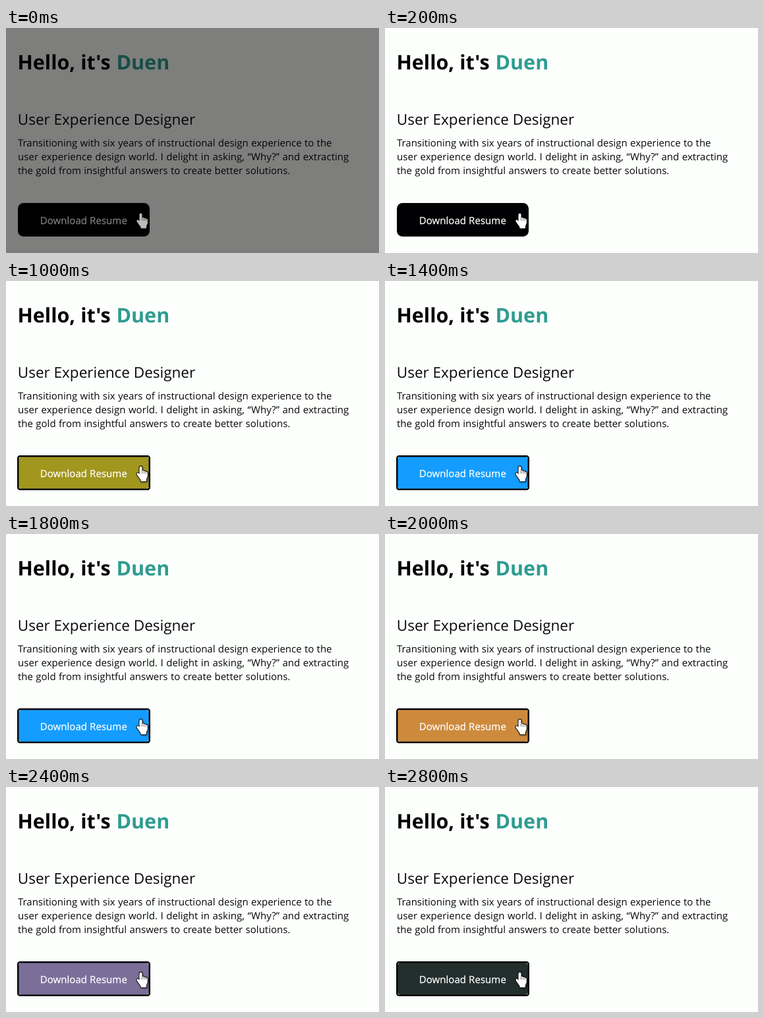
These frames come from a looping animation (566x342 px, 3 s). An HTML page:

```html
<!DOCTYPE html>
<html lang="en">
<head>
<meta charset="utf-8">
<title>Portfolio button</title>
<style>
  html, body { margin: 0; width: 100%; height: 100%; overflow: hidden; background: #fdfffc; }
  svg { display: block; width: 566px; height: 342px; }
  text { font-family: "Open Sans", "Noto Sans", sans-serif; font-size: 15px; text-rendering: geometricPrecision; white-space: pre; fill: #06070a; }
  .hello { font-size: 30.5px; font-weight: 700; fill: #010103; }
  .name { fill: #2f9c90; }
  .role { font-size: 22.5px; }
  .about { word-spacing: .5px; }
  .label { fill: #fff; stroke: #fff; stroke-width: .25; }

  .button, .ring, .dim, .hand { animation: 3s step-end infinite; }
  .button { animation-name: recolor; }
  .ring { fill: none; stroke: #06060a; stroke-width: 2.5; animation-name: focus; }
  .dim { animation-name: dim; }
  .hand { stroke: #000; stroke-width: 1.8; stroke-linejoin: round; paint-order: stroke; animation-name: lighten; }
  .cursor { filter: drop-shadow(1px 1px 1px rgba(0, 0, 0, .4)); }
  .knuckles { fill: none; stroke: #000; stroke-width: .6; }

  @keyframes recolor {
    0% { fill: #010103; }
    26.6667% { fill: #a1961e; }
    46.6667% { fill: #149dfe; }
    66.6667% { fill: #cd8a3d; }
    80% { fill: #7b6f9a; }
    93.3333%, 100% { fill: #232f2d; }
  }
  @keyframes focus {
    0% { opacity: 0; }
    20%, 100% { opacity: 1; }
  }
  @keyframes dim {
    0% { opacity: .5; }
    6.6667%, 100% { opacity: 0; }
  }
  @keyframes lighten {
    0% { fill: #bcbcba; }
    6.6667%, 100% { fill: #fff; }
  }
</style>
</head>
<body>
<svg viewBox="0 0 566 342">
  <rect width="566" height="342" fill="#fdfffc"/>

  <text class="hello" x="17.5" y="63">Hello, it's</text>
  <text class="hello name" x="167.5" y="63">Duen</text>
  <text class="role" x="17.8" y="147">User Experience Designer</text>

  <g class="about">
    <text x="18" y="180" letter-spacing="-.02">Transitioning with six years of instructional design experience to the</text>
    <text x="18" y="201" letter-spacing=".05">user experience design world. I delight in asking, “Why?” and extracting</text>
    <text x="18" y="222">the gold from insightful answers to create better solutions.</text>
  </g>

  <rect class="button" x="18" y="266" width="200" height="51" rx="8.5"/>
  <rect class="ring" x="18.25" y="266.25" width="199.5" height="50.5" rx="3"/>
  <text class="label" x="51.7" y="298" letter-spacing=".06">Download Resume</text>

  <rect class="dim" width="566" height="342"/>

  <g class="cursor">
    <path class="hand" d="M202.5 283.7a2 2 0 0 1 4 0V288.6a2 2 0 0 1 2.9.6a2 2 0 0 1 2.8.7a1.9 1.9 0 0 1 2.6 1.9V297l-1.8 4V304.5h-8.5V302.5l-3.6-5l-2.2-3.2a1.6 1.6 0 0 1 2.5-2l1.3 1.4z"/>
    <path class="knuckles" d="M206.5 288.6v4M209.4 289.2v3.6M212.2 289.9v3.2"/>
  </g>
</svg>
</body>
</html>
```
